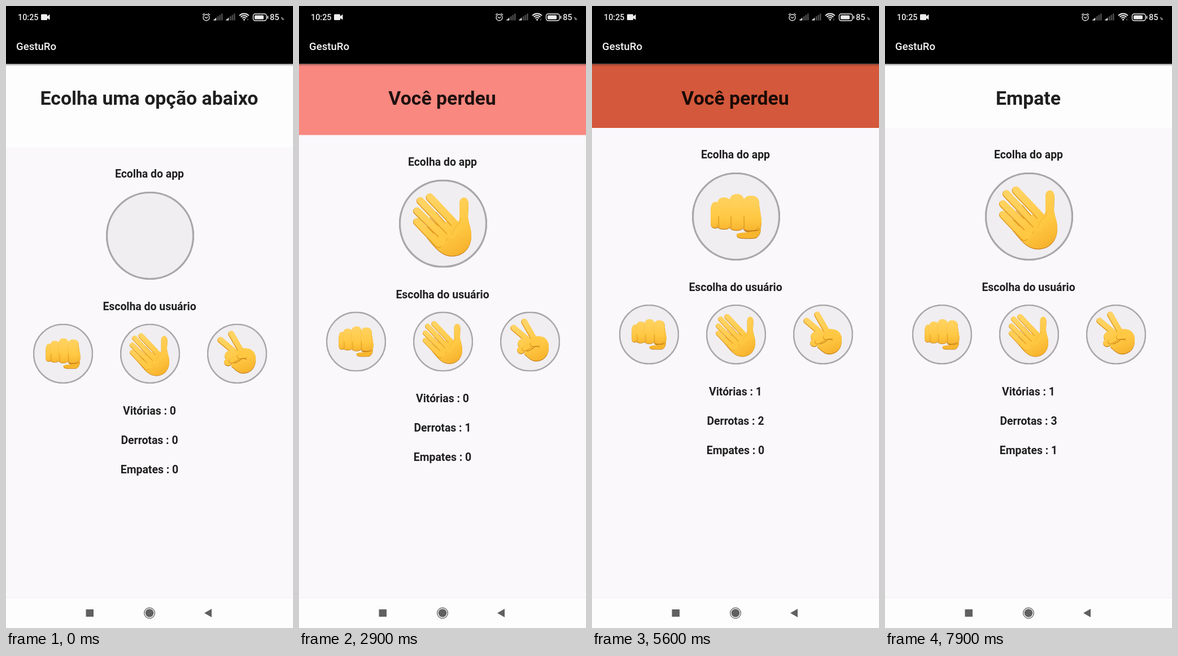
Recreate the animation shown at these times as an HTML page with a canvas. Size 508 px wide and 1102 px high, loop 8000 ms.

```html
<!DOCTYPE html>
<html lang="pt">
<head>
<meta charset="utf-8">
<title>Jogo de mãos</title>
<style>
html, body { margin: 0; width: 100%; height: 100%; overflow: hidden; background: #faf8fb; }
canvas { display: block; width: 508px; height: 1102px; }
</style>
</head>
<body>
<canvas id="stage"></canvas>
<script>
const W = 508, H = 1102, LOOP = 8000, TICK = 100, FADE = 1000;
const canvas = document.getElementById('stage');
const dpr = window.devicePixelRatio || 1;
canvas.width = W * dpr;
canvas.height = H * dpr;
const c = canvas.getContext('2d');

const WHITE = [254, 253, 254], RED = [244, 67, 54], GREEN = [76, 175, 80];
const INK = 'rgba(0,0,0,.88)', EDGE = '#c47c19', SHADE = '#e39a20';

// Each round: start time, message, banner colour, app hand, wins, losses, draws
const rounds = [
  { at: 0, msg: 'Ecolha uma opção abaixo', color: WHITE, hand: null, score: [0, 0, 0] },
  { at: 2270, msg: 'Você perdeu', color: RED, hand: paper, score: [0, 1, 0] },
  { at: 3550, msg: 'Parabêns, você venceu', color: GREEN, hand: rock, score: [1, 1, 0] },
  { at: 4790, msg: 'Você perdeu', color: RED, hand: rock, score: [1, 2, 0] },
  { at: 5740, msg: 'Você perdeu', color: RED, hand: paper, score: [1, 3, 0] },
  { at: 6700, msg: 'Empate', color: WHITE, hand: paper, score: [1, 3, 1] }
];

const clamp = v => Math.max(0, Math.min(1, v));
const mix = (a, b, p) => a.map((v, i) => Math.round(v + (b[i] - v) * p));
const rgb = a => `rgb(${a})`;

function rect(x, y, w, h, fill) {
  c.fillStyle = fill;
  c.fillRect(x, y, w, h);
}

function text(s, x, y, size, weight, fill, align = 'center') {
  c.font = `${weight} ${size}px Roboto, sans-serif`;
  c.textAlign = align;
  c.fillStyle = fill;
  c.fillText(s, x, y);
}

function disc(x, y, r, fill) {
  c.beginPath();
  c.arc(x, y, r, 0, 7);
  c.fillStyle = fill;
  c.fill();
}

function poly(points, fill) {
  c.beginPath();
  points.forEach(([x, y]) => c.lineTo(x, y));
  c.closePath();
  c.fillStyle = fill;
  c.fill();
}

function line(x1, y1, x2, y2, width, stroke) {
  c.beginPath();
  c.moveTo(x1, y1);
  c.lineTo(x2, y2);
  c.lineCap = 'round';
  c.lineWidth = width;
  c.strokeStyle = stroke;
  c.stroke();
}

function skin(x1, y1, x2, y2) {
  const g = c.createLinearGradient(x1, y1, x2, y2);
  g.addColorStop(0, '#ffd362');
  g.addColorStop(.6, '#ffc843');
  g.addColorStop(1, '#f6b02a');
  return g;
}

// A rounded finger with a darker lower edge
function finger(x1, y1, x2, y2, width, fill) {
  line(x1 - .6, y1 + 1, x2 - .6, y2 + 1, width, SHADE);
  line(x1, y1, x2, y2, width - 1, fill);
}

function shape(path, fill) {
  const p = new Path2D(path);
  c.save();
  c.translate(0, 1.2);
  c.fillStyle = EDGE;
  c.fill(p);
  c.restore();
  c.fillStyle = fill;
  c.fill(p);
}

function paper() {
  const g = skin(-25, -40, 32, 58);
  shape('M-14 -2 L22 -4 Q28 1 29 -9 L29 -36 C29 -50 45 -50 45 -35 L44 -13 ' +
    'C45 0 50 6 50 21 C50 43 35 58 14 57 C-2 56 -12 44 -20 35 L-29 24 Z', g);
  finger(-46, -4, -8, 36, 13, g);
  finger(-46, -23, 2, 24, 13, g);
  finger(-40, -41, 12, 14, 13, g);
  finger(-23, -47, 24, 3, 14, g);
  line(24, 4, 15, 18, 16, '#ffc843');
  line(0, 22, -3, 32, 14, '#ffc843');
  line(-12, -20, 3, -2, 1.3, SHADE);
  line(-23, -10, -9, 4, 1.3, SHADE);
  line(-28, 6, -17, 17, 1.3, SHADE);
  c.beginPath();
  c.moveTo(31, -9);
  c.bezierCurveTo(30, 3, 18, 5, 16, 20);
  c.lineWidth = 1;
  c.strokeStyle = '#efb136';
  c.stroke();
}

function rock() {
  const g = skin(0, -38, 0, 30);
  shape('M12 22 L43 18 Q46 29 36 37 Q32 39 10 38 Q0 37 1 31 Q7 28 22 28 Z', '#f7b62e');
  shape('M32 -36 Q42 -34 41 -20 L45 5 Q46 18 40 24 L18 26 Z', g);
  const knuckles = [[-45, -26, 16, 46], [-34, -34, 25, 56], [-12, -40, 26, 64], [12, -37, 28, 62]];
  knuckles.forEach(([x, y, w, h]) => {
    shape(`M${x} ${y + 14} Q${x + 1} ${y} ${x + w / 2} ${y} Q${x + w} ${y} ${x + w} ${y + 13} ` +
      `L${x + w} ${y + h - 10} Q${x + w} ${y + h} ${x + w / 2} ${y + h} Q${x} ${y + h} ${x} ${y + h - 9} Z`, g);
  });
  [-31, -9, 14].forEach(x => line(x, 0, x + .5, 20, 1.5, SHADE));
  line(-29, -17, -29, -4, 4, '#ffcc4e');
  line(16, 26, 34, 25, 1.6, EDGE);
}

function scissors() {
  c.scale(1.47, 1.47);
  const g = skin(-10, -30, 18, 36);
  shape('M-6 -5 Q6 -12 20 -9 C30 -7 34 2 33 12 C32 27 21 35 9 34 C1 33 -4 27 -10 22 Z', g);
  finger(-29, -25, -3, -3, 10.5, g);
  finger(-10, -36, 6, -8, 10.5, g);
  line(4, 0, 15, 0, 12, '#ffc843');
  shape('M-22 3 Q-21 -5 -11 -6 Q0 -7 2 0 Q2 6 -5 7 L-16 10 Q-22 9 -22 3 Z', g);
  shape('M-23 14 Q-22 8 -14 8 Q-8 9 -9 15 Q-10 21 -16 21 Q-23 20 -23 14 Z', g);
  finger(-10, 12, 5, 4, 9, '#ffc843');
  finger(5, 4, 14, 3, 9, '#ffc843');
  c.beginPath();
  c.moveTo(-6, 17);
  c.quadraticCurveTo(3, 15, 8, 9);
  c.quadraticCurveTo(12, 8, 17, 10);
  c.lineWidth = 1.2;
  c.strokeStyle = EDGE;
  c.stroke();
}

function button(x, y, r, hand, width) {
  c.save();
  c.beginPath();
  c.rect(x - r, y - r, 2 * r, 2 * r);
  c.clip();
  disc(x, y, r - 1, '#f0eef1');
  c.beginPath();
  c.arc(x, y, r - width / 2 + .3, 0, 7);
  c.lineWidth = width;
  c.strokeStyle = '#a9a7aa';
  c.stroke();
  if (hand) {
    c.translate(x, y);
    c.scale(r / 78, r / 78);
    hand();
  }
  c.restore();
}

function signal(x) {
  for (let i = 0; i < 5; i++) rect(x + i * 3.5, 23 - i * 2.4, 2.6, 2.5 + i * 2.4, '#4b4b4b');
  poly([[x, 25.5], [x + 5, 25.5], [x + 5, 21]], '#ddd');
}

function statusBar() {
  const pale = '#ededed';
  text('10:25', 21, 25.2, 14.4, 500, pale, 'left');
  c.beginPath();
  c.roundRect(62, 14.5, 11, 10.5, 1.5);
  c.fillStyle = pale;
  c.fill();
  poly([[72, 19], [77.5, 14.8], [77.5, 24.6], [72, 21]], pale);

  c.beginPath();
  c.arc(354.5, 20.5, 5.5, 0, 7);
  c.lineWidth = 1.3;
  c.strokeStyle = pale;
  c.stroke();
  line(348.5, 15.5, 351, 13.5, 1.4, pale);
  line(358, 13.5, 360.5, 15.5, 1.4, pale);
  line(352, 19.5, 354.5, 21.5, 1.2, pale);
  line(354.5, 21.5, 357, 19.5, 1.2, pale);

  signal(367);
  signal(389);

  c.lineCap = 'butt';
  [11.5, 8, 4.5].forEach(r => {
    c.beginPath();
    c.arc(421.5, 25, r, -Math.PI * .76, -Math.PI * .24);
    c.lineWidth = 2;
    c.strokeStyle = pale;
    c.stroke();
  });
  disc(421.5, 24.3, 1.5, pale);
  line(428, 23, 428, 25, 1, '#aaa');

  c.beginPath();
  c.roundRect(437.5, 14, 23.5, 12, 3.5);
  c.lineWidth = 1.4;
  c.strokeStyle = pale;
  c.stroke();
  c.beginPath();
  c.roundRect(440, 16.5, 16, 7, 1.5);
  c.fillStyle = pale;
  c.fill();
  rect(462.5, 17.5, 1.8, 5, pale);
  text('85', 467, 25.2, 14.6, 500, pale, 'left');
  text('%', 486.5, 25, 7.5, 500, pale, 'left');
}

function navBar() {
  const gray = '#616061';
  rect(0, 1048, W, 54, '#fefdfe');
  rect(0, 1048, W, 1, '#efedf0');
  rect(141.5, 1069, 13.5, 13, gray);
  disc(254, 1075.5, 7.3, gray);
  c.beginPath();
  c.arc(254, 1075.5, 9.4, 0, 7);
  c.lineWidth = 1.3;
  c.strokeStyle = gray;
  c.stroke();
  poly([[351, 1075.5], [364, 1068], [364, 1083]], gray);
}

function draw(ms) {
  const t = Math.floor(ms / TICK) * TICK;
  let i = rounds.length - 1;
  while (rounds[i].at > t) i--;
  const now = rounds[i], before = rounds[Math.max(0, i - 1)];
  const banner = mix(before.color, now.color, clamp((t - now.at) / FADE));
  const lift = 34 * clamp((t - rounds[1].at) / FADE);

  c.setTransform(dpr, 0, 0, dpr, 0, 0);
  rect(0, 0, W, H, '#faf8fb');
  rect(0, 103, W, 147 - lift, rgb(banner));
  rect(0, 0, W, 102.5, '#000');
  const shadow = c.createLinearGradient(0, 102, 0, 107);
  shadow.addColorStop(0, 'rgba(0,0,0,.35)');
  shadow.addColorStop(1, 'rgba(0,0,0,0)');
  rect(0, 102, W, 5, shadow);
  statusBar();
  text('GestuRo', 18, 78, 18.6, 500, '#f3f3f3', 'left');
  text(now.msg, 253.5, 174.5, 33.8, 700, INK);

  c.save();
  c.translate(0, -lift);
  text('Ecolha do app', 254, 304.3, 19.4, 700, INK);
  button(255, 407, 78, now.hand, 3.4);
  text('Escolha do usuário', 254, 539.3, 19.4, 700, INK);
  [rock, paper, scissors].forEach((hand, k) => button(101 + 154 * k, 616, 53, hand, 2.6));
  ['Vitórias', 'Derrotas', 'Empates'].forEach((name, k) =>
    text(`${name} : ${now.score[k]}`, 254, 723.5 + 52 * k, 19.4, 700, INK));
  c.restore();
  navBar();
}

const start = performance.now();
function loop() {
  draw((performance.now() - start) % LOOP);
  requestAnimationFrame(loop);
}
loop();
</script>
</body>
</html>
```
